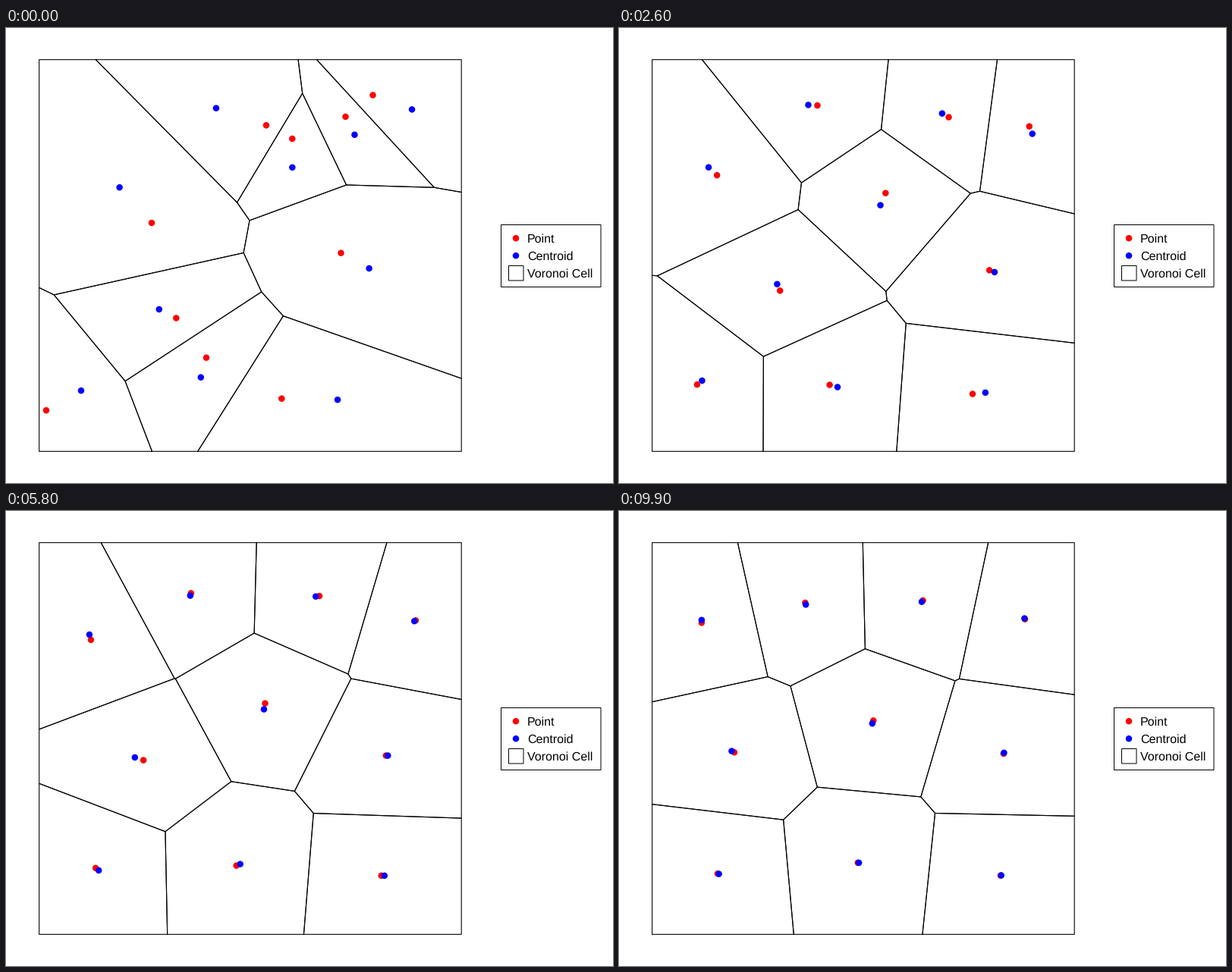
A matplotlib script that plays this animation: 800 by 600 pixels, repeating every 10 s.

```python
import matplotlib.pyplot as plt
import numpy as np
from matplotlib.animation import FuncAnimation
from matplotlib.collections import PolyCollection
from matplotlib.patches import Rectangle

plt.rcParams["font.family"] = "Liberation Sans"
plt.rcParams["text.hinting"] = "none"

FRAMES, INTERVAL = 100, 100
RATE = 0.1                       # share of the way to the centroid per step
PX = 0.72                        # points per pixel at 100 dpi
LINE = 1.1 * PX
DOT = (8.5 * PX) ** 2

ORIGIN = np.array([43.7, 41.7])
SIZE = np.array([556.5, 516.6])
SQUARE = np.array([[0, 0], [1, 0], [1, 1], [0, 1]], float)

START = np.array([
    [192, 257], [343, 128.3], [377.3, 146], [447.5, 117], [483.5, 88.5],
    [441.5, 296.7], [224.3, 382.5], [264, 434.7], [363.3, 488.7], [53, 504.2],
])


def to_px(p):
    return ORIGIN + p * SIZE


def clip(poly, p, q):
    """Keep the part of poly that is nearer to p than to q."""
    side = (poly - (p + q) / 2) @ (q - p)
    out = []
    for i in range(len(poly)):
        j = (i + 1) % len(poly)
        if side[i] <= 0:
            out.append(poly[i])
        if (side[i] <= 0) != (side[j] <= 0):
            t = side[i] / (side[i] - side[j])
            out.append(poly[i] + t * (poly[j] - poly[i]))
    return np.array(out)


def voronoi(points):
    cells = []
    for i, p in enumerate(points):
        cell = SQUARE
        for j, q in enumerate(points):
            if i != j:
                cell = clip(cell, p, q)
        cells.append(cell)
    return cells


def centroid(poly):
    nxt = np.roll(poly, -1, axis=0)
    cross = poly[:, 0] * nxt[:, 1] - nxt[:, 0] * poly[:, 1]
    return ((poly + nxt) * cross[:, None]).sum(axis=0) / (3 * cross.sum())


def relax(points, steps):
    """Lloyd relaxation with damped moves."""
    states = []
    for _ in range(steps):
        cells = voronoi(points)
        centers = np.array([centroid(c) for c in cells])
        states.append((points, centers, cells))
        points = points + RATE * (centers - points)
    return states


states = relax((START - ORIGIN) / SIZE, FRAMES)

fig = plt.figure(figsize=(8, 6), dpi=100, facecolor="white")
ax = fig.add_axes([0, 0, 1, 1])
ax.set_xlim(0, 800)
ax.set_ylim(600, 0)
ax.axis("off")


def box(x, y, w, h):
    ax.add_patch(Rectangle((x, y), w, h, fc="white", ec="black", lw=PX, snap=False))


def dots(xy, colors, z):
    return ax.scatter(*np.transpose(xy), s=DOT, c=colors, linewidths=0, zorder=z)


box(652.5, 259.5, 131.5, 82)
box(662.5, 313.5, 19.5, 19.5)
dots([(672, 277.2), (672, 300.2)], ["red", "blue"], 3)
for row, label in enumerate(["Point", "Centroid", "Voronoi Cell"]):
    ax.text(687, 283 + 23.1 * row, label, fontsize=16 * PX, va="baseline")

mesh = PolyCollection([to_px(c) for c in states[0][2]], facecolors="none",
                      edgecolors="black", linewidths=LINE, joinstyle="round")
mesh.set_snap(False)
ax.add_collection(mesh, autolim=False)
n = len(START)
marks = dots(to_px(np.vstack(states[0][:2])), ["red"] * n + ["blue"] * n, 4)


def update(frame):
    points, centers, cells = states[frame]
    mesh.set_verts([to_px(c) for c in cells])
    marks.set_offsets(to_px(np.vstack([points, centers])))
    return mesh, marks


anim = FuncAnimation(fig, update, frames=FRAMES, interval=INTERVAL,
                     repeat=True, repeat_delay=0)
plt.show()
```
